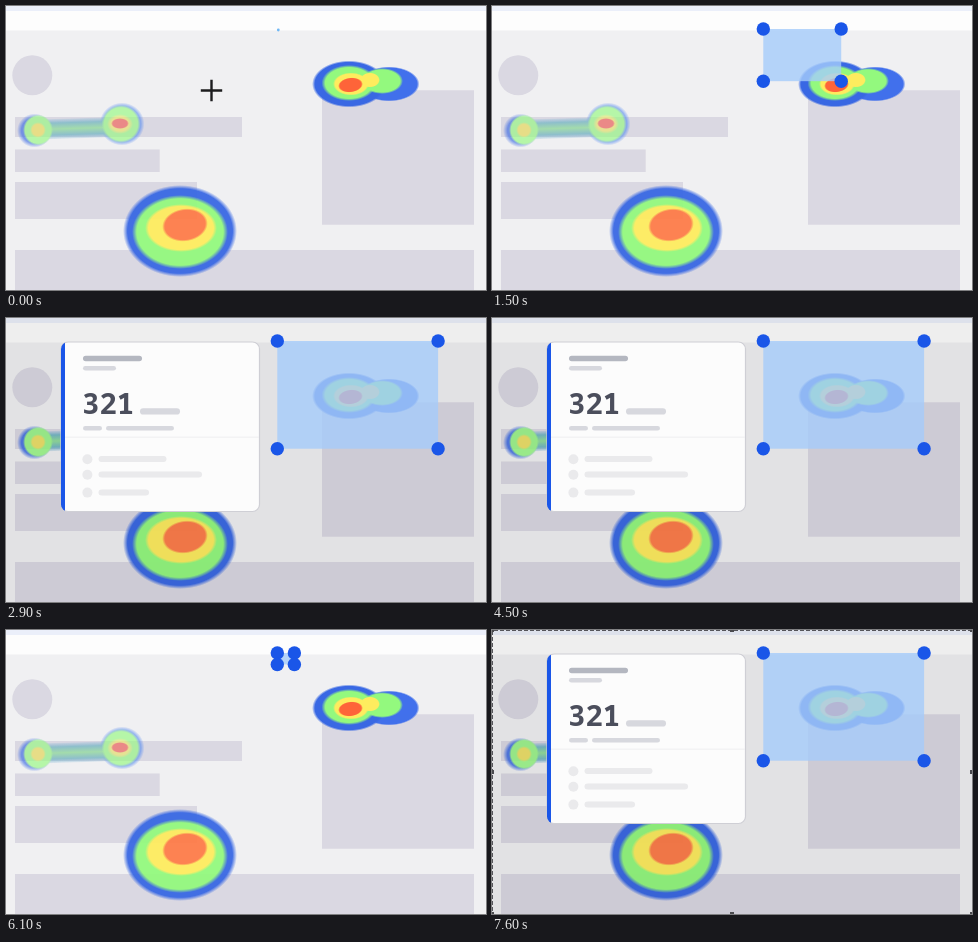
Write an HTML page with a canvas that moves like this. It is 480 px wide and 284 px high and loops after 7.7 s.

```html
<!DOCTYPE html>
<html lang="en">
<head>
<meta charset="utf-8">
<title>Heatmap selection</title>
<style>
html, body { margin: 0; width: 100%; height: 100%; overflow: hidden; background: #f0f0f2; }
canvas { display: block; width: 480px; height: 284px; }
</style>
</head>
<body>
<canvas id="stage"></canvas>
<script>
const W = 480, H = 284, LOOP = 7700;
const RESET = 4800, RESTART = 4850, FRAME_ON = 6300;
const dpr = window.devicePixelRatio || 1;
const BLUE = '#1a56e8', GREY = '#dad8e2';

function layer(canvas) {
  canvas.width = W * dpr;
  canvas.height = H * dpr;
  const c = canvas.getContext('2d');
  c.scale(dpr, dpr);
  return c;
}

const ctx = layer(document.getElementById('stage'));
const clamp = v => Math.min(1, Math.max(0, v));
const span = (t, from, to) => clamp((t - from) / (to - from));
const ease = u => u * u * (3 - 2 * u);
const mix = (a, b, u) => a + (b - a) * u;

function box(x1, y1, x2, y2, color) {
  ctx.fillStyle = color;
  ctx.fillRect(x1, y1, x2 - x1, y2 - y1);
}

function disc(x, y, r, color) {
  ctx.fillStyle = color;
  ctx.beginPath();
  ctx.arc(x, y, r, 0, Math.PI * 2);
  ctx.fill();
}

function roundPath(x, y, w, h, r) {
  ctx.beginPath();
  ctx.moveTo(x + r, y);
  ctx.arcTo(x + w, y, x + w, y + h, r);
  ctx.arcTo(x + w, y + h, x, y + h, r);
  ctx.arcTo(x, y + h, x, y, r);
  ctx.arcTo(x, y, x + w, y, r);
  ctx.closePath();
}

function pill(x1, y1, x2, y2, color) {
  ctx.fillStyle = color;
  roundPath(x1, y1, x2 - x1, y2 - y1, (y2 - y1) / 2);
  ctx.fill();
}

// Ellipse with a soft rim; rgb is an "r,g,b" string.
function glow(c, x, y, rx, ry, rgb, soft, turn = 0) {
  c.save();
  c.translate(x, y);
  c.rotate(turn);
  c.scale(rx, ry);
  const g = c.createRadialGradient(0, 0, 0, 0, 0, 1);
  g.addColorStop(0, `rgba(${rgb},1)`);
  g.addColorStop(1 - soft, `rgba(${rgb},1)`);
  g.addColorStop(1, `rgba(${rgb},0)`);
  c.fillStyle = g;
  c.beginPath();
  c.arc(0, 0, 1, 0, Math.PI * 2);
  c.fill();
  c.restore();
}

const COLD = '54,102,228', MILD = '146,250,124', WARM = '255,236,92', HOT = '255,122,70';

function makeLayer(draw) {
  const canvas = document.createElement('canvas');
  draw(layer(canvas));
  return canvas;
}

const mainHeat = makeLayer(c => {
  glow(c, 174, 225, 57, 46, COLD, 0.08);
  glow(c, 174, 226, 48, 37, MILD, 0.1);
  glow(c, 175, 222, 36, 24, WARM, 0.1);
  glow(c, 179, 219, 23, 16.5, HOT, 0.12, -0.15);
});

const cornerHeat = makeLayer(c => {
  glow(c, 383, 78, 30.5, 17.5, '62,110,236', 0.08);
  glow(c, 343, 78, 37, 23.5, COLD, 0.08);
  glow(c, 343, 77, 27.5, 18, MILD, 0.14);
  glow(c, 376, 75, 21, 13, MILD, 0.14);
  glow(c, 345, 78, 18, 11.5, WARM, 0.12);
  glow(c, 364, 74, 10, 7.5, WARM, 0.14);
  glow(c, 344.5, 79, 12.5, 7.5, '255,98,54', 0.14, -0.12);
});

const trailHeat = makeLayer(c => {
  glow(c, 28.5, 124.5, 17.5, 17, COLD, 0.25);
  glow(c, 116, 118, 22.5, 21.5, '92,142,240', 0.16);
  c.save();
  c.translate(32, 123.5);
  c.rotate(-0.03);
  const g = c.createLinearGradient(0, -10, 0, 10);
  g.addColorStop(0, 'rgba(90,160,205,0.2)');
  g.addColorStop(0.2, 'rgb(96,176,190)');
  g.addColorStop(0.5, 'rgb(130,222,140)');
  g.addColorStop(0.8, 'rgb(96,176,190)');
  g.addColorStop(1, 'rgba(90,160,205,0.2)');
  c.fillStyle = g;
  c.fillRect(0, -10, 80, 20);
  c.restore();
  glow(c, 32, 124, 15, 15.5, MILD, 0.14);
  glow(c, 32, 124, 8, 8, '240,225,80', 0.3);
  glow(c, 115, 118, 19.5, 19, MILD, 0.14);
  glow(c, 114, 118, 13, 10, '240,232,100', 0.3);
  glow(c, 114, 117.5, 9, 5.5, '245,90,80', 0.2);
});

function stamp(canvas, alpha) {
  ctx.globalAlpha = alpha;
  ctx.drawImage(canvas, 0, 0, W, H);
  ctx.globalAlpha = 1;
}

function page(dim) {
  box(0, 0, W, H, '#f0f0f2');
  box(0, 0, W, 5, '#ebeffa');
  box(0, 5, W, 24.5, '#fdfdfd');
  disc(26.3, 69.3, 20, GREY);
  box(9, 111, 236, 131, GREY);
  box(9, 143.5, 153.7, 166, GREY);
  box(9, 176, 191, 213, GREY);
  box(316, 84.3, 468, 218.7, GREY);
  box(9, 244, 468, H, GREY);
  stamp(trailHeat, mix(0.62, 0.82, dim));
  stamp(mainHeat, mix(0.93, 0.97, dim));
  stamp(cornerHeat, 0.98);
  if (dim > 0) box(0, 0, W, H, `rgba(0,0,0,${0.06 * dim})`);
}

function cross(t) {
  if (t > 1110) return;
  const u = ease(span(t, 0, 1100));
  const x = mix(205.5, 271.5, u), y = mix(84.5, 23.5, u);
  ctx.strokeStyle = '#1c1c1e';
  ctx.lineWidth = 2.4;
  ctx.beginPath();
  ctx.moveTo(x - 10.7, y);
  ctx.lineTo(x + 10.7, y);
  ctx.moveTo(x, y - 10.7);
  ctx.lineTo(x, y + 10.7);
  ctx.stroke();
}

function selection(t) {
  const x = 271.3, y = 23;
  const u = ease(span(t, 1075, 1945));
  const w = 160.8 * u, h = 107.7 * u;
  const r = 6.7 * span(t, 1075, 1180);
  if (r === 0) {
    disc(272.3, 24, 1.4, '#72b8f4');
    return;
  }
  box(x, y, x + w, y + h, 'rgba(166,204,252,0.8)');
  for (const hx of [x, x + w])
    for (const hy of [y, y + h]) disc(hx, hy, r, BLUE);
}

function card(alpha) {
  if (alpha <= 0) return;
  const mid = '#d7d8de', pale = '#eaeaec';
  ctx.save();
  ctx.globalAlpha = alpha;
  roundPath(55, 24, 198.5, 169.5, 7);
  ctx.fillStyle = '#fcfcfc';
  ctx.fill();
  ctx.strokeStyle = '#cfcfd5';
  ctx.lineWidth = 1.2;
  ctx.stroke();
  ctx.save();
  ctx.clip();
  box(55, 24, 59, 194, BLUE);
  box(59, 118.6, 253, 119.6, '#eeeef0');
  ctx.restore();

  pill(77, 37.8, 136, 43.2, '#b4b7c0');
  pill(77, 48, 110, 52.6, mid);
  ctx.fillStyle = '#4b4e5c';
  ctx.font = '600 29px "Noto Sans Mono", "DejaVu Sans Mono", monospace';
  ctx.textBaseline = 'alphabetic';
  ctx.fillText('321', 76, 96);
  pill(134, 90.3, 174, 96.5, mid);
  pill(77, 108, 96, 112.6, mid);
  pill(100, 108, 168, 112.6, mid);

  [[141.2, 160.5], [156.8, 196], [174.6, 143]].forEach(([y, end]) => {
    disc(81.4, y, 5, pale);
    pill(92.5, y - 3.2, end, y + 2.8, pale);
  });
  ctx.restore();
}

function outline() {
  ctx.save();
  ctx.strokeStyle = '#55555a';
  ctx.lineWidth = 1;
  ctx.setLineDash([4, 2]);
  ctx.beginPath();
  ctx.moveTo(W, 0.5);
  ctx.lineTo(0.5, 0.5);
  ctx.lineTo(0.5, H);
  ctx.stroke();
  ctx.restore();
  for (const x of [0, W / 2, W])
    for (const y of [0, H / 2, H])
      if (x !== W / 2 || y !== H / 2) box(x - 2, y - 2, x + 2, y + 2, '#4a4a4e');
}

function draw(now) {
  const clock = now % LOOP;
  const t = clock < RESET ? clock : Math.max(0, clock - RESTART);
  const shown = ease(span(t, 1900, 2300));
  page(shown);
  selection(t);
  cross(t);
  card(shown);
  if (clock >= FRAME_ON) outline();
}

const start = performance.now();
function tick() {
  draw(performance.now() - start);
  requestAnimationFrame(tick);
}
tick();
</script>
</body>
</html>
```
